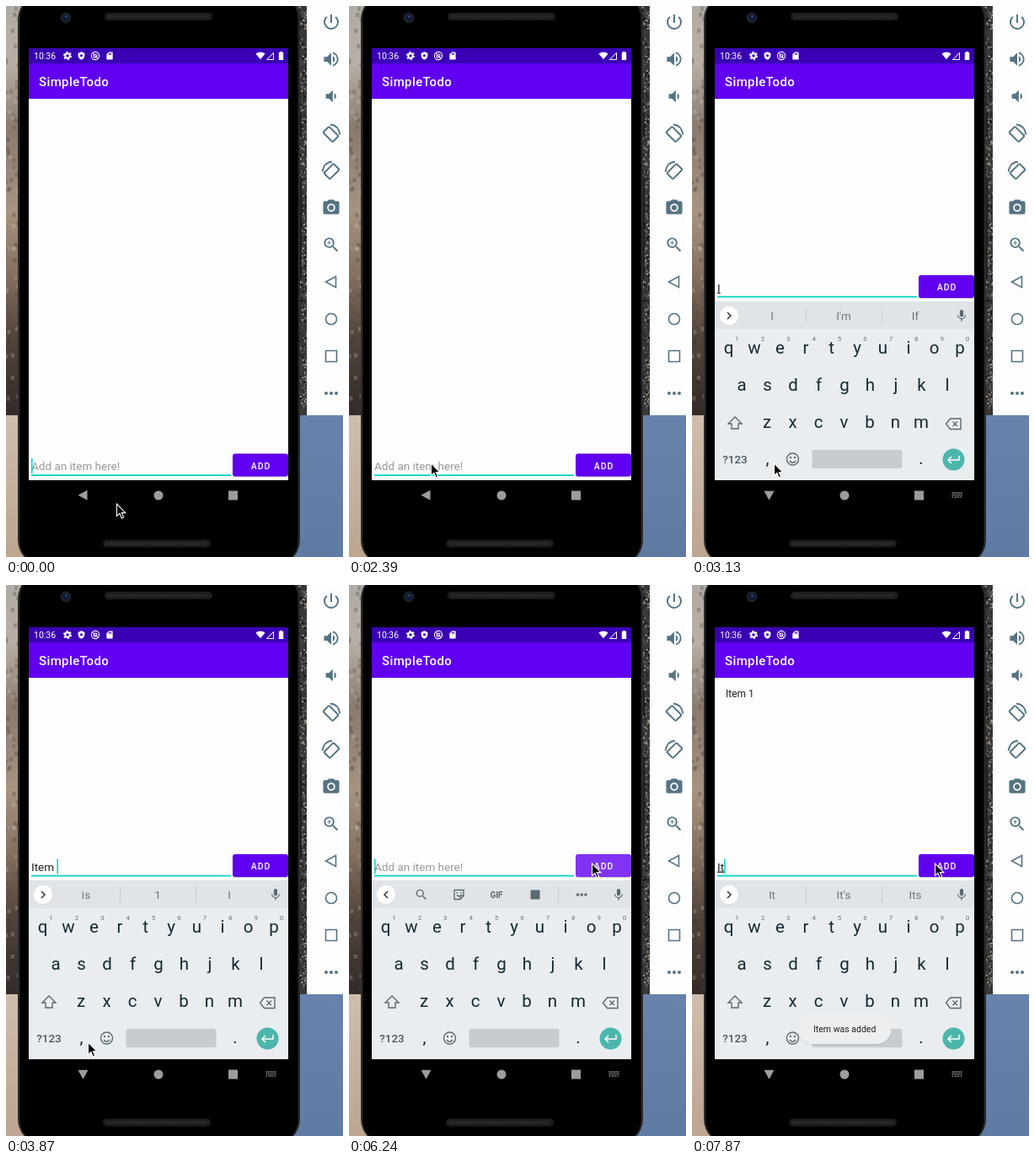
An HTML page for the animation above (8000 ms loop, 400 px wide and 653 px high).

```html
<!DOCTYPE html>
<html lang="en">
<head>
<meta charset="utf-8">
<title>Todo list demo</title>
<style>
  html, body { margin: 0; width: 100%; height: 100%; overflow: hidden; background: #000; }
  svg { display: block; width: 100vw; height: 100vh; }
  text { font-family: Roboto, Arial, sans-serif; white-space: pre; }
  .mid { text-anchor: middle; }
  .line { fill: none; stroke: currentColor; }
  .icon { fill: currentColor; fill-rule: evenodd; }
  .key { font-size: 20.5px; fill: #162932; }
  .digit { font-size: 8px; fill: #69747b; }
</style>
</head>
<body>
<svg viewBox="0 0 400 653">
  <defs>
    <linearGradient id="street" x2="0" y2="1">
      <stop offset="0" stop-color="#b0aaa4"/><stop offset=".14" stop-color="#b9afa6"/>
      <stop offset=".3" stop-color="#8a7a6e"/><stop offset=".5" stop-color="#a8937f"/>
      <stop offset=".66" stop-color="#846e5d"/><stop offset=".8" stop-color="#54463d"/>
      <stop offset="1" stop-color="#332b28"/>
    </linearGradient>
    <linearGradient id="ground" x2="0" y2="1">
      <stop offset="0" stop-color="#cfbdab"/><stop offset="1" stop-color="#bda58f"/>
    </linearGradient>
    <linearGradient id="sea" x2="0" y2="1">
      <stop offset="0" stop-color="#6783ab"/><stop offset="1" stop-color="#5f7ba3"/>
    </linearGradient>
  </defs>

  <!-- desktop -->
  <rect width="30" height="485" fill="url(#street)"/>
  <rect y="485" width="40" height="168" fill="url(#ground)"/>
  <rect x="330" width="27" height="485" fill="#3a3937"/>
  <g id="specks"></g>
  <rect x="330" y="485" width="70" height="168" fill="url(#sea)"/>
  <rect x="357" width="43" height="485" fill="#fdfdfd"/>
  <g id="sidebar" color="#557482"></g>

  <!-- phone -->
  <path d="M348 126h3v28h-3zM348 206h3v118h-3z" fill="#202020"/>
  <rect x="14" y="-14" width="335" height="677" rx="30" fill="#2b2b2b"/>
  <rect x="16.500" y="-13" width="330" height="675" rx="28" fill="#000" stroke="#111"/>
  <rect x="117" y="8" width="128" height="9" rx="4.500" fill="#1c1c1c"/>
  <rect x="115" y="632.500" width="128" height="9" rx="4.500" fill="#1c1c1c"/>
  <path d="M121 12.500h120M119 637h120" stroke="#303030" stroke-width="4" stroke-dasharray="1 1"/>
  <circle cx="71" cy="14" r="6.500" fill="#1b2028"/>
  <circle cx="71" cy="14" r="3.500" fill="#101b38"/>
  <circle cx="71.500" cy="12.500" r="1.200" fill="#3a5080"/>

  <!-- app -->
  <rect x="27" y="50" width="308" height="512" fill="#fdfdfd"/>
  <rect x="27" y="68" width="308" height="42" fill="#6100f0"/>
  <rect x="27" y="50" width="308" height="18" fill="#3900b4"/>
  <text x="33" y="63" font-size="10.500" fill="#fff">10:36</text>
  <g id="status" color="#fff">
    <circle class="line" cx="73" cy="59" r="2.700" stroke-width="2"/>
    <circle class="line" cx="73" cy="59" r="4.200" stroke-width="1.700" stroke-dasharray="2.200"/>
    <circle class="line" cx="106" cy="59" r="4.600" stroke-width="1.100"/>
    <circle class="line" cx="106" cy="59" r="2" stroke-width="1.100"/>
    <path class="line" d="M103 56l6 6"/>
    <path class="line" d="M309.500 63.500h8v-8z" stroke-width="1"/>
    <path class="icon" d="M325 54h3v1h1.200v9h-5.400v-9h1.200z"/>
  </g>
  <text x="39" y="95" font-size="15" font-weight="500" letter-spacing=".38" fill="#fff">SimpleTodo</text>
  <text id="item" x="40" y="133" font-size="12" fill="#212121">Item 1</text>

  <g id="form">
    <path d="M30 556.200h237" stroke="#03d3c0" stroke-width="1.700"/>
    <text id="hint" x="30" y="550" font-size="13.500" fill="#999">Add an item here!</text>
    <text id="entry" x="30" y="550" font-size="13.500" fill="#212121"></text>
    <rect id="caret" y="536" width="1.500" height="18" fill="#03d3c0"/>
    <rect x="269" y="531" width="66" height="27.500" rx="3" fill="#0003"/>
    <rect x="269" y="530.500" width="66" height="27" rx="3" fill="#6100f0"/>
    <rect id="ripple" x="269" y="530.500" width="66" height="27" rx="3" fill="#fff"/>
    <text class="mid" x="302.500" y="548.500" font-size="10.500" font-weight="500" letter-spacing=".94" fill="#fff">ADD</text>
  </g>

  <!-- navigation bar -->
  <g fill="#9c9c9c">
    <path id="back" d="M85.500 579.700l11-6v12z"/>
    <circle cx="181" cy="580" r="5.500"/>
    <rect x="264" y="574.500" width="11" height="11"/>
    <path id="switcher" d="M308.500 577h12M308.500 579.500h12M308.500 582h2m1 0h6m1 0h2" fill="none" stroke="#8c8c8c" stroke-width="1.500" stroke-dasharray="1.500 .6"/>
  </g>

  <g id="keyboard" color="#5c686f">
    <rect x="27" y="350" width="308" height="212" fill="#e9edf0"/>
    <rect x="27" y="350" width="308" height="33" fill="#e0e4e8"/>
    <circle cx="44" cy="367.500" r="11" fill="#0001"/>
    <circle cx="44" cy="367" r="11" fill="#fff"/>
    <path id="chevron" class="line" color="#30393e" stroke-width="1.500"/>
    <g id="suggestions" font-size="13.500" fill="#6c767d">
      <path d="M135.500 358v18M225.500 358v18" stroke="#c6cbcf"/>
      <text class="mid" x="95" y="372"></text>
      <text class="mid" x="180" y="372"></text>
      <text class="mid" x="265" y="372"></text>
    </g>
    <g id="tools">
      <path class="line" d="M125 361.500h11v7l-4 4h-7zM132 372v-4h4M128 367q1.500 3 4 1" stroke-width="1.300"/>
      <path class="icon" d="M127.500 364h1.500v1.500h-1.500zM132 364h1.500v1.500h-1.500z"/>
      <text class="mid" x="175" y="370.500" font-size="10" font-weight="700" fill="currentColor">GIF</text>
      <rect class="icon" x="215.500" y="361.500" width="11" height="11" rx="1"/>
      <path d="M248.500 358v18" stroke="#c6cbcf"/>
      <path class="icon" d="M270 365.500h3v3h-3zM274.700 365.500h3v3h-3zM279.400 365.500h3v3h-3z"/>
    </g>
    <g id="keys"></g>
    <path class="line" d="M51 487l-8 8h4v6h8v-6h4zM306.500 489h12.500v12.500h-12.500l-5-6.250zM309.500 492.500l5.500 5.500m0-5.500l-5.500 5.500" stroke-width="1.400"/>
    <text class="mid" x="51" y="542" font-size="13.500" font-weight="500" fill="#4a575e">?123</text>
    <circle class="line" cx="119.500" cy="537" r="7" stroke-width="1.400"/>
    <path class="line" d="M116 539q3.500 4.500 7 0" stroke-width="1.400"/>
    <path class="icon" d="M116 534h2v2h-2zM121 534h2v2h-2z"/>
    <rect x="142.500" y="526" width="107" height="22" rx="2" fill="#c7ccd0"/>
    <circle cx="310.500" cy="537.500" r="13" fill="#4db6ac"/>
    <path class="line" color="#fff" d="M317 533v5h-13m4-4l-4 4 4 4" stroke-width="1.500"/>
  </g>

  <g id="toast">
    <rect x="126" y="510" width="110.500" height="35.500" rx="17.500" fill="#0001"/>
    <rect x="126" y="509" width="110.500" height="35" rx="17.500" fill="#eceeef"/>
    <text x="144" y="530" font-size="10.500" fill="#222">Item was added</text>
  </g>

  <path id="pointer" d="M0 0V14.500L3.400 11.400 5.800 17 8.200 16 5.800 10.600H10.300Z" fill="#000" stroke="#fff" stroke-width="1.100"/>
</svg>

<script>
const $ = id => document.getElementById(id);
const add = (id, markup) => $(id).insertAdjacentHTML('beforeend', markup);

// Icons are drawn on a 24-unit grid and centred on (x, y).
const icon = (d, x, y, size) =>
  `<path class="icon" d="${d}" transform="translate(${x} ${y}) scale(${size / 24}) translate(-12 -12)"/>`;
const SEARCH = 'M15.500 14h-.79l-.28-.27A6.470 6.470 0 0 0 16 9.500 6.500 6.500 0 1 0 9.500 16c1.610 0 3.090-.59 4.230-1.570l.27.28v.79l5 4.990L20.490 19zM9.500 14a4.500 4.500 0 1 1 0-9 4.500 4.500 0 0 1 0 9z';
const POWER = 'M13 3h-2v10h2zm4.830 2.170l-1.420 1.420A6.920 6.920 0 0 1 19 12 7 7 0 1 1 7.580 6.580L6.170 5.170A8.930 8.930 0 0 0 3 12a9 9 0 0 0 18 0c0-2.740-1.230-5.180-3.170-6.830z';
const LOUD = 'M3 9v6h4l5 5V4L7 9zm13.500 3A4.500 4.500 0 0 0 14 7.970v8.050c1.480-.73 2.500-2.250 2.500-4.020zM14 3.230v2.060a7 7 0 0 1 0 13.420v2.060a9 9 0 0 0 0-17.540z';
const QUIET = 'M18.500 12A4.500 4.500 0 0 0 16 7.970v8.050c1.480-.73 2.500-2.250 2.500-4.020zM5 9v6h4l5 5V4L9 9z';
const CAMERA = 'M9 2L7.170 4H4a2 2 0 0 0-2 2v12a2 2 0 0 0 2 2h16a2 2 0 0 0 2-2V6a2 2 0 0 0-2-2h-3.170L15 2zm3 15a5 5 0 1 1 0-10 5 5 0 0 1 0 10zm0-8.200a3.200 3.200 0 1 0 0 6.400 3.200 3.200 0 0 0 0-6.400z';
const MIC = 'M12 14a3 3 0 0 0 3-3V5a3 3 0 0 0-6 0v6a3 3 0 0 0 3 3zm5.300-3a5.300 5.100 0 0 1-10.600 0H5c0 3.410 2.720 6.230 6 6.720V21h2v-3.280c3.280-.48 6-3.300 6-6.720z';
const SHIELD = 'M12 1L3 5v6c0 5.550 3.840 10.740 9 12 5.160-1.260 9-6.450 9-12V5zm0 7a3.500 3.500 0 1 1 0 7 3.500 3.500 0 0 1 0-7z';
const CARD = 'M18 2h-8L4 8v12a2 2 0 0 0 2 2h12a2 2 0 0 0 2-2V4a2 2 0 0 0-2-2zM9 5h2v4H9zM12 5h2v4h-2zM15 5h2v4h-2z';
const WIFI = 'M12 21L0 7C6 1.500 18 1.500 24 7z';

const rotation = (y, flip) => `<g class="line" stroke-width="2" transform="translate(386 ${y}) scale(${flip} 1)">
  <rect x="-5" y="-8" width="10" height="16" rx="1.200" transform="translate(-.5 1) rotate(-45)"/>
  <path d="M-1 -10.500Q8.500 -10 10.500 1.500" stroke-width="1.800"/></g>`;

add('sidebar', icon(POWER, 386, 19, 24) + icon(LOUD, 386, 63, 23) + icon(QUIET, 386, 107, 22) +
  rotation(151, 1) + rotation(195, -1) + icon(CAMERA, 386, 239, 23) +
  icon(SEARCH + 'M12 10h-2v2H9v-2H7V9h2V7h1v2h2z', 386, 283, 23) +
  `<path class="line" d="M379.500 327l12-6.500v13zM379.500 408.500h13v13h-13z" stroke-width="1.600"/>
  <circle class="line" cx="386" cy="371" r="6.500" stroke-width="1.600"/>` +
  [380, 386, 392].map(x => `<circle class="icon" cx="${x}" cy="459" r="2"/>`).join(''));
add('status', icon(SHIELD, 89.5, 59, 10.5) + icon(CARD, 123, 59, 11) + icon(WIFI, 302, 59, 11));
add('keyboard', icon(MIC, 320, 367, 17));
add('tools', icon(SEARCH, 86, 367, 17));

const key = (c, x, y) => `<text class="key mid" x="${x}" y="${y}">${c}</text>`;
const row = (letters, x, y) => [...letters].map((c, i) => key(c, x + i * 30.5, y)).join('');
add('keys', row('qwertyuiop', 43.5, 412) + row('asdfghjkl', 59, 456) + row('zxcvbnm', 89, 500) +
  key(',', 89.5, 543) + key('.', 272, 543) +
  [...'1234567890'].map((c, i) => `<text class="digit mid" x="${53.5 + i * 30.4}" y="397">${c}</text>`).join(''));

// Grainy photo strips on both sides of the phone.
let seed = 7;
const random = () => (seed = seed * 16807 % 2147483647) / 2147483647;
function grain(count, x, width, size, colors) {
  for (let i = 0; i < count; i++)
    add('specks', `<rect x="${x + random() * width}" y="${random() * (485 - size)}" width="${size * .8}"
      height="${size}" fill="${colors[i % colors.length]}"/>`);
}
grain(600, 347, 10, 2, ['#0d0e13', '#5c5a5a', '#8f8780', '#2d3038', '#b8ada1', '#1b1c22']);
grain(70, -2, 16, 5, ['#4a3d3540', '#d8cfc640', '#2f282540']);

const LOOP = 8000;
const typed = [[0, ''], [2680, 'I'], [3430, 'It'], [3730, 'Item'], [3870, 'Item '],
  [4470, 'Item 1'], [6240, ''], [7420, 'I'], [7870, 'It']];
const proposals = {
  'I': ['I', "I'm", 'If'], 'It': ['It', "It's", 'Its'],
  'Item': ['Item', 'Items', 'Itemized'], 'Item ': ['is', '1', 'I']
};
const caretFlips = [450, 900, 1350, 1940, 2390, 2680, 3130, 3430, 4910, 5350, 6680, 7420];
const pointerPath = [[0, 131.5, 590], [1050, 124, 576], [1200, 103, 549], [1350, 97.5, 542],
  [4620, 106, 530], [4770, 160, 441], [4910, 208.5, 372], [5060, 250, 347],
  [5210, 278, 334], [5350, 287, 331], [5500, 288.5, 330]];
const rippleFade = [[0, 0], [6240, .2], [6530, .12], [6680, .05], [6830, 0]];
const toastFade = [[0, 0], [6530, .3], [6680, .6], [6830, .9], [6970, 1]];

const at = (steps, t) => steps.findLast(([start]) => start <= t).slice(1);
const set = (id, name, value) => $(id).setAttribute(name, value);
const show = (id, visible) => set(id, 'visibility', visible ? 'visible' : 'hidden');

function draw(t) {
  const [text] = at(typed, t);
  const words = proposals[text];
  const open = t >= 2680;
  const sliding = open && t < 2830;

  $('entry').textContent = text;
  set('entry', 'text-decoration', words && !text.endsWith(' ') ? 'underline' : 'none');
  show('hint', !text);
  set('caret', 'x', 30 + (text ? $('entry').getComputedTextLength() : 0));
  show('caret', caretFlips.filter(flip => flip <= t).length % 2 === 0);
  set('form', 'transform', `translate(0 ${open ? -211.5 : 0})`);
  show('item', t >= 6390);
  set('ripple', 'opacity', at(rippleFade, t)[0]);
  set('toast', 'opacity', at(toastFade, t)[0]);

  show('keyboard', open);
  show('switcher', open);
  set('keyboard', 'opacity', sliding ? .78 : 1);
  set('keyboard', 'transform', `translate(0 ${sliding ? 11.5 : 0})`);
  set('back', 'transform', `rotate(${sliding ? -70 : open ? -90 : 0} 91.5 579.7)`);
  set('suggestions', 'display', words ? 'inline' : 'none');
  set('tools', 'display', words ? 'none' : 'inline');
  set('chevron', 'd', words ? 'M42 363l4 4-4 4' : 'M46 363l-4 4 4 4');
  if (words) document.querySelectorAll('#suggestions text').forEach((el, i) => el.textContent = words[i]);

  set('pointer', 'transform', `translate(${at(pointerPath, t)})`);
}

function frame() {
  draw(performance.now() % LOOP);
  requestAnimationFrame(frame);
}
frame();
</script>
</body>
</html>
```
